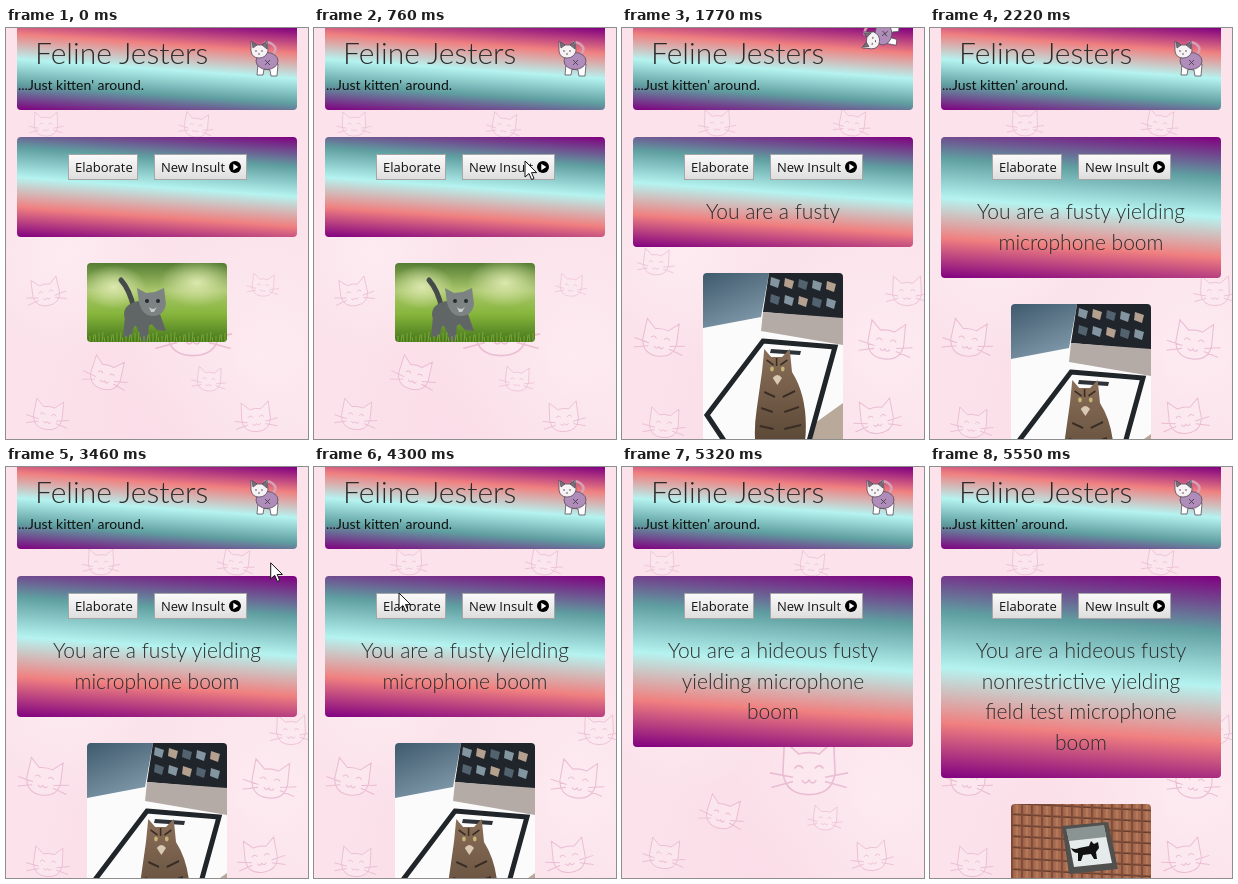
Animation, 302 px wide and 411 px high, one loop 7.57 s. Source, as an HTML page:

```html
<!DOCTYPE html>
<html lang="en">
<head>
<meta charset="utf-8">
<title>Feline Jesters</title>
<style>
  html, body { margin: 0; width: 100%; height: 100%; overflow: hidden; }
  #stage {
    position: relative; width: 302px; height: 411px; overflow: hidden; color: #2b2b2b;
    font-family: Lato, sans-serif;
    background:
      radial-gradient(circle at 20% 55%, #fff3f688, transparent 30%),
      radial-gradient(circle at 85% 80%, #fff3f688, transparent 35%),
      radial-gradient(circle at 55% 95%, #f9d3e166, transparent 35%),
      #fbe2eb;
  }
  svg { display: block; }
  .layer { position: absolute; left: 0; top: 0; }
  #cats { fill: #fdeaf1; stroke: #dfa3c3; stroke-width: 1.1; opacity: .6; }
  header, #panel { position: absolute; left: 11px; width: 280px; }
  header {
    top: 0; height: 82px; border-radius: 0 0 4px 4px;
    background: linear-gradient(184deg, purple, lightcoral, #b5f3f0, cadetblue, purple);
  }
  h1, h2, p { margin: 0; font-weight: 400; white-space: nowrap; }
  h1 { position: absolute; left: 18px; top: 6px; font-size: 30px; font-weight: 300; line-height: 36px; }
  h2 { position: absolute; left: 1px; top: 48px; font-size: 14px; line-height: 18px; color: #111; }
  #flow { position: absolute; top: 109px; left: 0; width: 302px; }
  #panel {
    position: relative; box-sizing: border-box; min-height: 100px; padding: 59px 20px 20.5px;
    border-radius: 4px; text-align: center;
    background: linear-gradient(184deg, purple, cadetblue, #b5f3f0, lightcoral, purple);
  }
  #panel p { white-space: normal; font-size: 21px; font-weight: 300; line-height: 30.5px; }
  .button {
    position: absolute; top: 17px; height: 26px; box-sizing: border-box; padding-left: 6px;
    border: 1px solid #a6a6a6; background: linear-gradient(#fafafa, #dedede);
    font: 13px/24px "Open Sans", "Noto Sans", sans-serif; color: #111;
    text-align: left; white-space: nowrap;
  }
  .button svg { position: absolute; right: 5px; top: 6px; }
  .photo { display: none; width: 140px; margin: 26px 0 0 81px; border-radius: 4px; overflow: hidden; }
</style>
</head>
<body>
<div id="stage">
  <svg class="layer" id="cats" width="302" height="411"></svg>
  <header><h1>Feline Jesters</h1><h2>...Just kitten' around.</h2></header>

  <div id="flow">
    <div id="panel">
      <div class="button" style="left:51px;width:70px">Elaborate</div>
      <div class="button" style="left:137px;width:93px">New Insult
        <svg width="12" height="12"><circle cx="6" cy="6" r="6"/><path d="M4.3 2.8 9.3 6 4.3 9.2Z" fill="#fff"/></svg>
      </div>
      <p id="insult"></p>
    </div>

    <div class="photo">
      <svg width="140" height="79">
        <defs>
          <linearGradient id="lawn" x2="0" y2="1">
            <stop stop-color="#557d32"/><stop offset=".35" stop-color="#a9c66b"/>
            <stop offset=".65" stop-color="#86b53c"/><stop offset="1" stop-color="#45751b"/>
          </linearGradient>
          <radialGradient id="glow"><stop stop-color="#dbe8ad"/><stop offset="1" stop-color="#dbe8ad00"/></radialGradient>
        </defs>
        <path d="M0 0H140V79H0Z" fill="url(#lawn)"/>
        <ellipse cx="27" cy="24" rx="32" ry="22" fill="url(#glow)"/>
        <ellipse cx="110" cy="20" rx="38" ry="24" fill="url(#glow)"/>
        <path d="M47 46Q43 27 34 17" fill="none" stroke="#454b4b" stroke-width="5" stroke-linecap="round"/>
        <g fill="#606666">
          <ellipse cx="54" cy="51" rx="17" ry="13"/>
          <path d="M38 53 36 74h8l4-14 7 18h6l1-20 8 9 9 1-6-17Z"/>
          <path d="M52 39 50 25l9 5 9-1 9-4 2 16q-2 12-13 12T52 39Z" fill="#7d8382"/>
        </g>
        <circle cx="60" cy="38" r="2" fill="#252b2c"/><circle cx="71" cy="38" r="2" fill="#252b2c"/>
        <path d="M62 44q4 4 8 0l-3 5h-3Z" fill="#c7cbc6"/>
        <path id="grass" fill="none" stroke="#78a934"/>
      </svg>
    </div>

    <div class="photo">
      <svg width="140" height="190">
        <defs>
          <linearGradient id="wall" x2=".5" y2="1"><stop stop-color="#3f5a6c"/><stop offset="1" stop-color="#7d97a8"/></linearGradient>
          <linearGradient id="fur" x2="0" y2="1"><stop stop-color="#8b6f59"/><stop offset="1" stop-color="#50402f"/></linearGradient>
        </defs>
        <path d="M0 0H140V190H0Z" fill="#fbfbfc"/>
        <path d="M0 0H66L58 44 0 55Z" fill="url(#wall)"/>
        <path d="M66 0H140V46L60 39Z" fill="#20252b"/>
        <g id="clips"></g>
        <path d="M60 39 140 45V72L58 58Z" fill="#b5aba6"/>
        <path d="M140 130 112 150 104 190H140Z" fill="#b9a99b"/>
        <path d="M60 68 132 74 100 190H36L4 142Z" fill="none" stroke="#20252a" stroke-width="5"/>
        <path d="M68 76 98 78 97 82 67 80Z" fill="#2c3238"/>
        <g transform="translate(12 3) scale(.77 1)">
          <path d="M61 96 64 73l9 8h14l10-8 3 23q18 22 18 54 0 30-14 36H58q-10-20-4-52Z" fill="url(#fur)"/>
          <path d="M67 84l9 5m9 0 9-5M64 116l14 5m10 0 16-6M60 132l15 4m15 0 19-5M58 150l18 3m14 0 22-4M80 82v8" stroke="#382c23" stroke-width="2"/>
          <circle cx="74" cy="93" r="2.4" fill="#c3b678"/><circle cx="88" cy="93" r="2.4" fill="#c3b678"/>
          <path d="M75 102q6-6 12 0l-6 7Z" fill="#dac9b5"/>
        </g>
      </svg>
    </div>

    <div class="photo">
      <svg width="140" height="93">
        <defs>
          <pattern id="tiles" width="10" height="11" patternUnits="userSpaceOnUse" patternTransform="skewY(3)">
            <path d="M0 0H10V11H0Z" fill="#a5694e"/>
            <path d="M0 9.5H10V11H0Z" fill="#653c2d"/>
            <path d="M0 0H2V11H0Z" fill="#7f4b38"/>
            <path d="M5 0H7V9H5Z" fill="#b97c5e"/>
          </pattern>
        </defs>
        <path d="M0 0H140V93H0Z" fill="url(#tiles)"/>
        <path d="M51 22 97 18 107 65 58 70Z" fill="#50504f"/>
        <path d="M56 27 93 23 101 59 63 63Z" fill="#e5ebeb"/>
        <path d="M55 25 93 21 95 33 58 37Z" fill="#8a9492"/>
        <path d="M60 44q4 2 8 0l10-2 2-5 3 3 4-2 1 6-3 4 1 7h-3l-3-5-8 1-2 6h-3v-8q-5 0-7-5Z" fill="#111"/>
      </svg>
    </div>
  </div>

  <svg class="layer" width="302" height="411">
    <g id="kitten" stroke="#574c5c" stroke-width=".8">
      <path d="M8-3Q15-9 8-14 4-17 0-15" fill="none" stroke="#d9a0b4" stroke-width="2.5"/>
      <path d="M-6 6-7 17h6l1-6 6 1 1 6h6l1-12Z" fill="#fff"/>
      <ellipse cx="3" cy="3" rx="11" ry="8.5" fill="#b08cba"/>
      <path d="M-13-7-13-17-7-13h5l5-4 1 10Q2 0-5 0T-13-7Z" fill="#f6f1f3"/>
      <path d="M-12-16-11-10-7-13Z" fill="#77717a"/><path d="M2-16-2-13 3-9Z" fill="#77717a"/>
      <path d="M-9-7h2m4 0h2M-6-4h2M1 2l5 5m0-5-5 5" fill="none" stroke="#3c3740"/>
    </g>
    <path id="cursor" d="M0 0V16L4 12.5 6.6 18.6 9 17.5 6.5 11.6H11.7Z" fill="#fff" stroke="#111"/>
  </svg>
</div>

<script>
const $ = id => document.getElementById(id);
const LOOP = 7570;
const photos = document.querySelectorAll('.photo');
const clamp = v => Math.max(0, Math.min(1, v));

// Wallpaper faces: x, y, scale, tilt
const shortPage = [[40, 265, .75, -10], [125, 262, .8, 5], [187, 303, 1.45, 0], [100, 347, .85, 15],
  [203, 352, .65, 5], [42, 388, .8, 8], [257, 258, .6, 5], [250, 390, .8, -5], [40, 97, .65, 0], [190, 98, .65, 8]];
const tallPage = [[264, 314, 1, 8], [38, 312, .95, 10], [285, 264, .8, 0], [34, 235, .7, 5],
  [255, 390, .9, -8], [42, 396, .8, 5], [95, 96, .7, 0], [230, 96, .7, 8]];
const face = 'M-18 2-17-20-7-11Q0-13 7-11L17-20 18 2Q16 17 0 17T-18 2ZM-10-1q3-4 6 0M4-1q3-4 6 0' +
  'M-5 7q2.5 4 5 0q2.5 4 5 0M-11 5l-16-3M-11 8l-15 4M11 5l16-3M11 8l15 4';
const wallpaper = list => list.map(([x, y, s, r]) =>
  `<path d="${face}" transform="translate(${x} ${y}) rotate(${r}) scale(${s})"/>`).join('');

// Word changes: start time, text
const insults = [
  [0, ''], [1690, 'You are a'], [1770, 'You are a fusty'], [1830, 'You are a fusty yielding'],
  [1910, 'You are a fusty yielding microphone boom'],
  [5250, 'You are a hideous fusty yielding microphone boom'],
  [5330, 'You are a hideous fusty nonrestrictive yielding microphone boom'],
  [5400, 'You are a hideous fusty nonrestrictive yielding field test microphone boom']];
// Photo changes: start time, index (-1 is none)
const shown = [[0, 0], [1500, -1], [1690, 1], [5000, -1], [5550, 2]];
const moves = [[210, 280, 400], [420, 262, 290], [600, 228, 175], [760, 211, 133], [1600, 211, 133],
  [3460, 265, 96], [3600, 225, 75], [3800, 140, 72], [3980, 57, 92], [4150, 79, 116],
  [4300, 85, 126], [4470, 88, 131], [5080, 88, 131]];

const latest = (list, t) => list.filter(e => e[0] <= t).pop()[1];

function pointer(t) {
  const i = moves.findIndex(m => m[0] > t);
  if (i < 1 || (t >= 1600 && t < 3460)) return null;
  const [a, b] = [moves[i - 1], moves[i]];
  const k = (t - a[0]) / (b[0] - a[0]);
  return [1, 2].map(j => a[j] + (b[j] - a[j]) * k);
}

function kittenPose(t) {
  const u = clamp((t - 1060) / 1080);
  const turn = 360 * (u < .5 ? 2 * u * u : 1 - 2 * (1 - u) ** 2);
  const drop = t < 1650 ? 125 * (Math.max(0, t - 1060) / 320) ** 2
                        : -60 * (1 - clamp((t - 1650) / 300)) ** 2;
  return `translate(258 ${30 + drop}) rotate(${turn})`;
}

let text, photo;
function draw(now) {
  const t = now % LOOP;
  const words = latest(insults, t), pic = latest(shown, t);
  if (words !== text) $('insult').textContent = text = words;
  if (pic !== photo) {
    photo = pic;
    photos.forEach((p, i) => p.style.display = i === pic ? 'block' : 'none');
    $('cats').innerHTML = wallpaper(pic > 0 ? tallPage : shortPage);
  }
  $('kitten').setAttribute('transform', kittenPose(t));
  const at = pointer(t);
  $('cursor').style.display = at ? '' : 'none';
  if (at) $('cursor').setAttribute('transform', `translate(${at})`);
  requestAnimationFrame(draw);
}

$('grass').setAttribute('d', Array.from({length: 47}, (_, i) =>
  `M${i * 3} 79l${i % 3 - 1} ${-5 - i * 7 % 6}`).join(''));
$('clips').innerHTML = Array.from({length: 10}, (_, i) => {
  const x = 68 + i % 5 * 14, y = 4 + (i / 5 | 0) * 17 + i % 5;
  return `<path d="M${x} ${y}l9 3-2 8-8-3Z" fill="${['#8395a0', '#b3a08f', '#52636f'][i % 3]}"/>`;
}).join('');
draw(performance.now());
</script>
</body>
</html>
```
